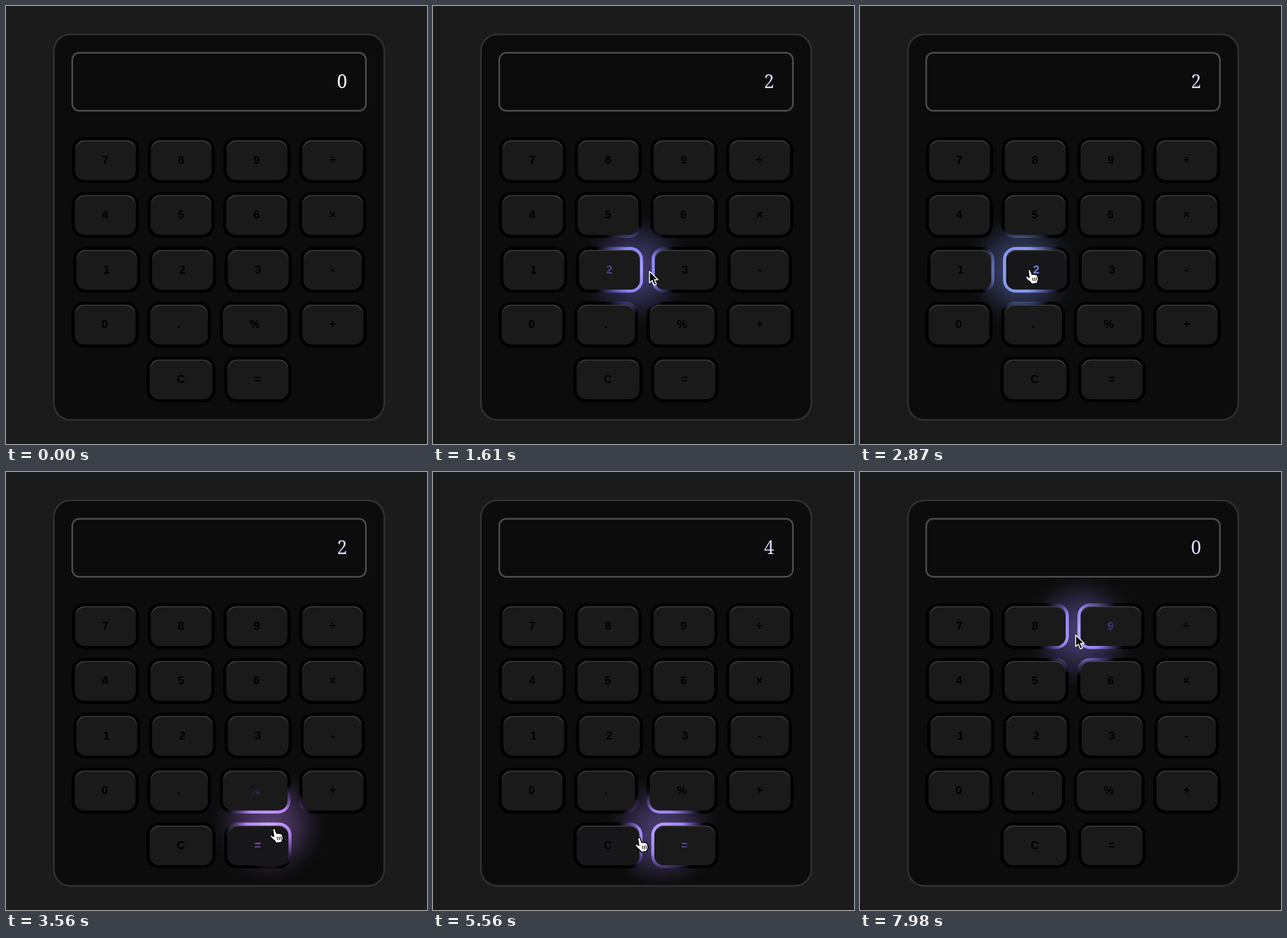
These frames come from a looping animation (734 px wide and 763 px high, 8000 ms). An HTML page with a canvas:

```html
<!DOCTYPE html>
<html lang="en">
<head>
<meta charset="utf-8">
<title>Glow calculator</title>
<style>
html, body { margin: 0; width: 100%; height: 100%; overflow: hidden; background: #1b1b1b; }
canvas { display: block; }
</style>
</head>
<body>
<canvas id="stage" width="734" height="763"></canvas>
<script>
const ctx = document.getElementById('stage').getContext('2d');
const LOOP = 8000, ENTER = 590, LAG = 70;
const KEY_FONT = 'bold 20px "Liberation Sans", Arial, sans-serif';
const MID = 371.5, TOP = 228.5, KEY_H = 80, GAP = 15, PITCH = 95.5, PAD = 105.9;

// Keys are as wide as their label plus padding; each row is centred.
ctx.font = KEY_FONT;
const KEYS = ['789÷', '456×', '123-', '0.%+', 'C='].flatMap((row, r) => {
  const labels = [...row];
  const widths = labels.map(s => ctx.measureText(s).width + PAD);
  let x = MID - (widths.reduce((a, b) => a + b) + GAP * (labels.length - 1)) / 2;
  return labels.map((label, i) => {
    const key = { label, x, y: TOP + r * PITCH, w: widths[i] };
    x += key.w + GAP;
    return key;
  });
});

// Key points of the pointer's path: time, x, y
const PATH = [
  [590, 725, 330], [950, 450, 340], [1280, 303, 459], [1420, 303, 459],
  [1540, 352, 459], [1610, 377, 462], [2030, 572, 585], [2240, 574, 548],
  [2600, 260, 400], [2800, 280, 459], [2870, 295, 459], [3070, 302, 461],
  [3490, 458, 614], [3560, 467, 621], [4450, 456, 638], [4600, 380, 610],
  [4790, 464, 604], [4860, 473, 595], [5280, 490, 605], [5750, 275, 652],
  [6000, 300, 620], [6450, 384, 528], [6520, 399, 532], [6940, 420, 490],
  [7400, 565, 425], [7910, 386, 278], [7980, 376, 284]
];

function readout(t) {
  if (t < 1420) return '0';
  if (t < 3980) return '2';
  return t < 5830 ? '4' : '0';
}

function slope(i, k) {
  const a = PATH[i - 1], b = PATH[i + 1];
  return a && b ? (b[k] - a[k]) / (b[0] - a[0]) : 0;
}

// Smooth curve through the key points
function pointAt(time) {
  const t = Math.max(time, PATH[0][0]);
  const next = PATH.findIndex(p => p[0] > t);
  const i = (next < 0 ? PATH.length - 1 : next) - 1;
  const a = PATH[i], b = PATH[i + 1], d = b[0] - a[0];
  const u = Math.min(1, (t - a[0]) / d), s = u * u * (3 - 2 * u);
  const mix = k => a[k] + (b[k] - a[k]) * s
    + d * u * (1 - u) * (slope(i, k) * (1 - u) - slope(i + 1, k) * u);
  return { x: mix(1), y: mix(2) };
}

const keyAt = p => KEYS.find(k =>
  p.x > k.x + 1 && p.x < k.x + k.w - 1 && p.y > k.y + 1 && p.y < k.y + KEY_H - 1);

function box(x, y, w, h, r, fill) {
  ctx.beginPath();
  ctx.roundRect(x, y, w, h, r);
  ctx.fillStyle = fill;
  ctx.fill();
}

function framed(x, y, w, h, r, edge) {
  box(x, y, w, h, r, edge);
  box(x + 3, y + 3, w - 6, h - 6, r - 3, '#0c0c0c');
}

function radial(p, r, color) {
  const g = ctx.createRadialGradient(p.x, p.y, 0, p.x, p.y, r);
  for (let u = 0; u <= 1; u += 0.125) g.addColorStop(u, color(u));
  return g;
}

function makeGlow(p) {
  const hue = 229 + 0.21 * (p.x - 280);
  const hsl = (s, l, a) => `hsla(${hue}, ${s}%, ${l}%, ${Math.min(1, a)})`;
  return {
    tint: hsl(90, 92, 1),
    haze: radial(p, 105, u => hsl(42, 57, 0.53 * (1 - u * u) ** 2)),
    ring: radial(p, 78, u => hsl(100 - 40 * u, 83 - 20 * u, 2 * (1 - u))),
    ink: radial(p, 78, u => hsl(80 - 30 * u, 72 - 14 * u, 1.6 * (1 - u)))
  };
}

function drawKey({ label, x, y, w }, glow, active) {
  box(x, y, w, KEY_H, 22, '#000');
  if (glow) box(x, y, w, KEY_H, 22, glow.ring);

  const fx = x + 5.5, fy = y + 5.5, fw = w - 11, fh = KEY_H - 11;
  const face = active ? '#171719' : '#1a1a1a';
  const shine = ctx.createLinearGradient(0, fy, 0, fy + 20);
  shine.addColorStop(0, '#414141');
  shine.addColorStop(1, face);
  box(fx, fy, fw, fh, 16, shine);
  box(fx + 0.5, fy + 1.5, fw - 1, fh - 1.5, 18, face);

  ctx.font = KEY_FONT;
  ctx.textAlign = 'center';
  for (const ink of ['#000', glow && glow.ink]) {
    if (!ink) continue;
    ctx.fillStyle = ink;
    ctx.fillText(label, x + w / 2 - 0.5, y + 46);
  }
}

const ARROW = new Path2D('M0 0V20L4.7 15.8L8.2 24L12 22.4L8.6 14.6H15Z');
const HAND = new Path2D('M-2 1.5Q0 -1.5 2 1L5 9Q7 7 8.6 9Q10.6 7.5 12 9.6Q14 9 14.6 11' +
  'L16 17Q16 20 14 22L13.5 24L4 25.5L2 22Q-3 19 -6 14.5Q-7 11 -4 11.5L0 14Z');
const FINGERS = new Path2D('M5.5 14.5L7 20M9 14L10 20M12.2 13.7L13 19.5');

function drawPointer(p, hand) {
  const shape = hand ? HAND : ARROW;
  ctx.save();
  ctx.translate(p.x, p.y);
  ctx.lineJoin = 'round';
  ctx.lineWidth = 1.6;
  ctx.fillStyle = hand ? '#fff' : '#050505';
  ctx.strokeStyle = hand ? '#000' : '#fff';
  ctx.fill(shape);
  ctx.stroke(shape);
  if (hand) {
    ctx.lineWidth = 1.2;
    ctx.stroke(FINGERS);
  }
  ctx.restore();
}

function draw(t) {
  const on = t >= ENTER;
  const tip = pointAt(t);
  const glow = on ? makeGlow(pointAt(t - LAG)) : null;
  const hover = on && keyAt(tip);

  ctx.fillStyle = '#1b1b1b';
  ctx.fillRect(0, 0, 734, 763);
  framed(82, 48, 579, 674.5, 30, '#303030');
  if (glow) box(85, 51, 573, 668.5, 27, glow.haze);

  framed(114, 80, 515, 104, 14, '#4a4a4a');
  ctx.font = '300 32px "Noto Serif", serif';
  ctx.textAlign = 'right';
  ctx.fillStyle = glow ? glow.tint : '#fff';
  ctx.fillText(readout(t), 595, 143);

  KEYS.forEach(k => drawKey(k, glow, k === hover));
  if (on) drawPointer(tip, !!hover);
}

const start = performance.now();
function tick() {
  draw((performance.now() - start) % LOOP);
  requestAnimationFrame(tick);
}
tick();
</script>
</body>
</html>
```
